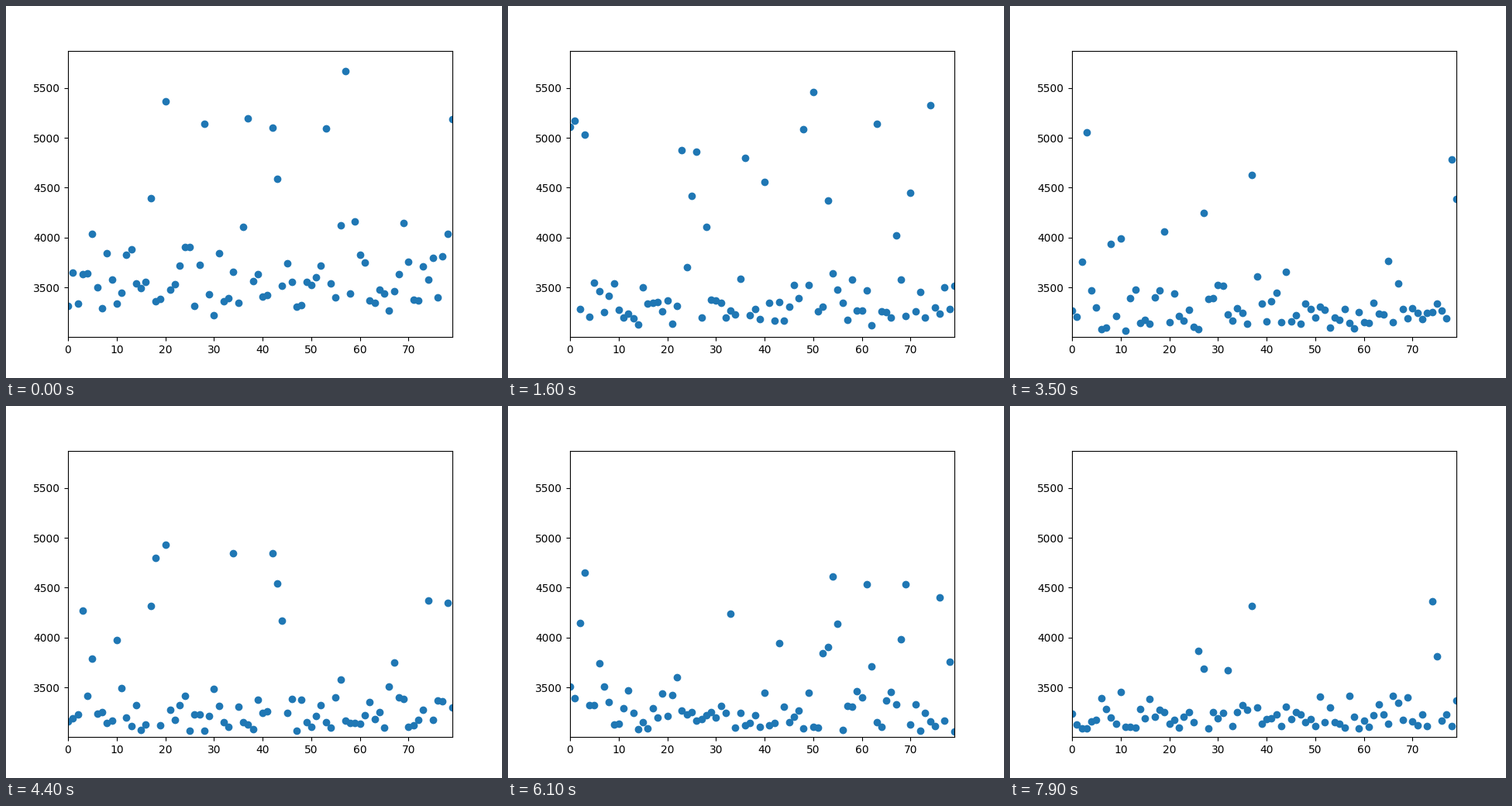
A matplotlib script that plays this animation: 640x480 px, repeating every 8000 ms.

```python
import matplotlib.pyplot as plt
import numpy as np
from matplotlib.animation import FuncAnimation

SIZE = 80          # members of the population
STEPS = 80         # generations in one loop
INTERVAL = 100     # ms per generation
FLOOR = 3050       # score the crowd settles towards


def scores(gen):
    """Scores of one generation: a settling crowd plus scattered peaks."""
    rng = np.random.default_rng(100 + gen)
    shape = 2.2 + 4 * np.exp(-gen / 16)
    crowd = FLOOR + rng.gamma(shape, 75, SIZE)
    top = 5750 - 17 * gen
    peaks = rng.uniform(3650, top, SIZE)
    chance = 0.11 + 0.12 * np.exp(-gen / 8)
    return np.where(rng.random(SIZE) < chance, peaks, crowd)


fig, ax = plt.subplots(figsize=(6.4, 4.8), dpi=100)
members = np.arange(SIZE)
dots = ax.scatter(members, scores(0))
ax.set_xlim(0, SIZE - 1)
ax.set_ylim(3001, 5876)


def update(gen):
    dots.set_offsets(np.column_stack([members, scores(gen)]))
    return (dots,)


anim = FuncAnimation(fig, update, frames=STEPS, interval=INTERVAL,
                     repeat=True, repeat_delay=0)
plt.show()
```
